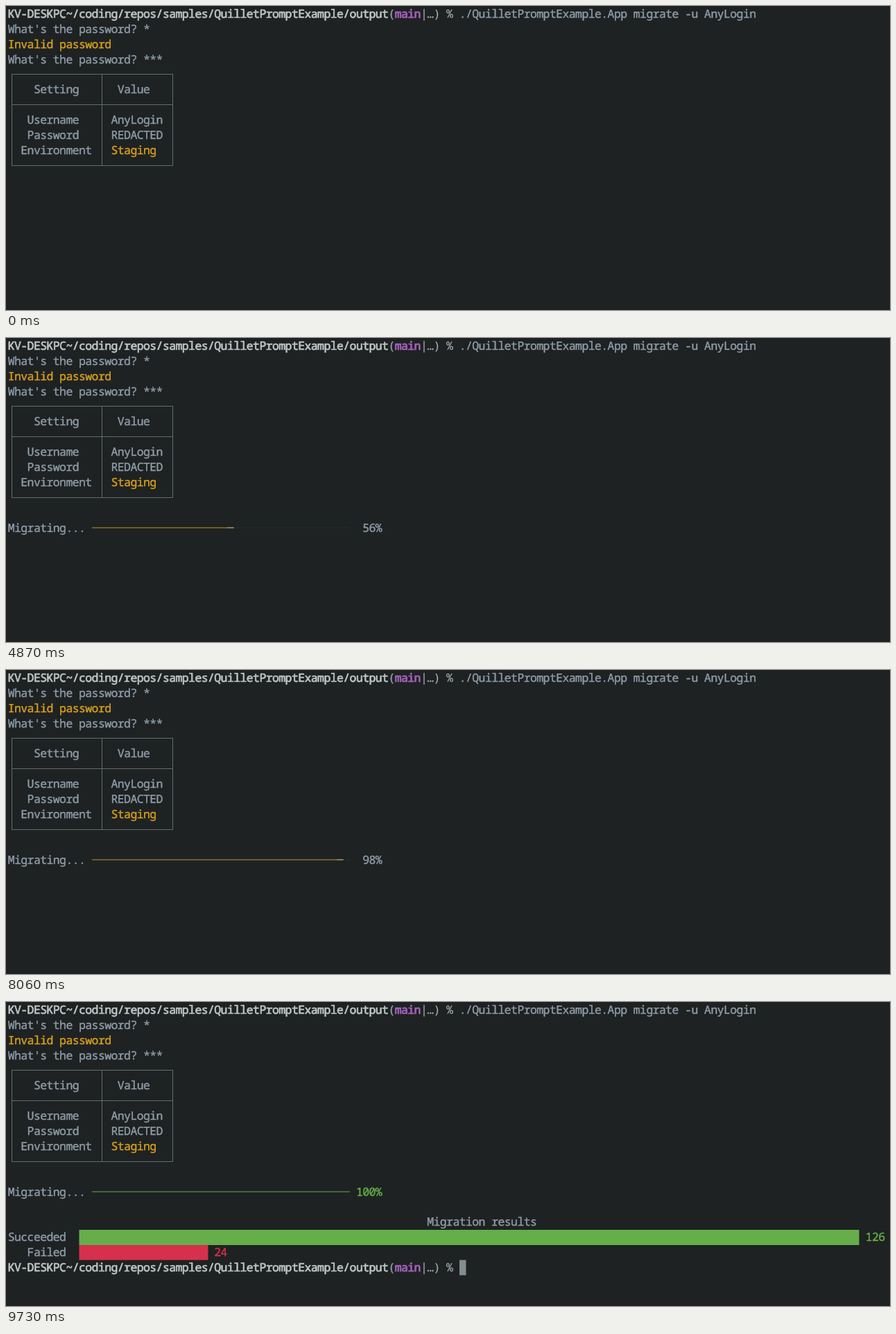
Recreate the animation shown at these times as an HTML page with a canvas. Size 1275 by 439 pixels, loop 9.8 s.

```html
<!DOCTYPE html>
<html lang="en">
<head>
<meta charset="utf-8">
<title>Migration terminal</title>
<style>
  html, body { margin: 0; width: 100%; height: 100%; overflow: hidden; background: #1e2222; }
  canvas { display: block; }
</style>
</head>
<body>
<canvas id="stage" width="1275" height="439"></canvas>
<script>
const ctx = document.getElementById('stage').getContext('2d');
const LOOP = 9800, CELL = 9.3, ROW = 21.9, LEFT = 3;
const DONE = 8130, PROMPT = 9450;
const C = {
  bg: '#1e2222', text: '#8f9ca9', bright: '#bfc5c6', purple: '#a25fb8',
  yellow: '#d8a01c', line: '#bd9334', pale: '#a39c84', track: '#1d3037',
  green: '#66ae49', red: '#d6304c', border: '#646c6c', cursor: '#838e8e'
};
const project = 'QuilletPromptExample';

// Screen refreshes: first time, gap, count
const refreshes = [
  [200, 140, 8], [1310, 140, 8], [2490, 165, 3], [3020, 165, 3],
  [3550, 215, 5], [4670, 200, 2], [5130, 230, 3], [5850, 260, 2],
  [6440, 260, 2], [7030, 260, 1], [7290, 70, 12]
].flatMap(([start, gap, n]) => Array.from({ length: n }, (_, i) => start + i * gap));

const colX = col => LEFT + col * CELL;

// A thin outline sets the stroke weight of the terminal face
function write(row, col, text, color = C.text, outline = 0.4) {
  ctx.fillStyle = ctx.strokeStyle = color;
  ctx.lineWidth = outline;
  [...text].forEach((ch, i) => {
    if (ch === ' ') return;
    const x = colX(col + i + 0.5), y = 16.8 + row * ROW;
    ctx.fillText(ch, x, y);
    ctx.strokeText(ch, x, y);
  });
}

function rect(x, y, w, h, color) {
  ctx.fillStyle = color;
  ctx.fillRect(x, y, w, h);
}

function prompt(row) {
  write(row, 0, `KV-DESKPC~/coding/repos/samples/${project}/output`, C.bright, 0.7);
  write(row, 59, '(');
  write(row, 60, 'main', C.purple, 0.9);
  write(row, 64, '|…) %', '#a3abb0', 0.2);
}

function table() {
  for (const y of [98, 142, 230]) rect(8, y, 233, 1, C.border);
  for (const x of [8, 138, 240]) rect(x, 98, 1, 133, C.border);
  write(5, 4, 'Setting');
  write(5, 17, 'Value');
  write(7, 3, 'Username');
  write(7, 16, 'AnyLogin');
  write(8, 3, 'Password');
  write(8, 16, 'REDACTED');
  write(9, 2, 'Environment');
  write(9, 16, 'Staging', C.yellow);
}

function percentAt(t) {
  if (t >= DONE) return 100;
  const tick = refreshes.filter(r => r <= t).pop();
  const p = tick < 7290 ? 11 + (tick - 1180) / 81.4 : 86 + (tick - 7290) / 60;
  return Math.max(0, Math.floor(p));
}

function progress(t) {
  const p = percentAt(t), done = p === 100;
  const cells = Math.floor(p * 0.4);
  const line = (from, to, color) =>
    rect(colX(13 + from), 273.5, (to - from) * CELL, 1, color);
  write(12, 0, 'Migrating...');
  line(cells, 40, C.track);
  line(0, cells, done ? C.green : C.line);
  if (!done && cells) line(cells - 1, cells, C.pale);
  write(12, 54, `${p}%`.padStart(4), done ? C.green : C.text);
}

function results() {
  write(14, 65, 'Migration results');
  write(15, 0, 'Succeeded');
  write(16, 3, 'Failed');
  rect(105.5, 329, 1125, 22, C.green);
  rect(105.5, 351, 186, 21.6, C.red);
  write(15, 133, '126', C.green);
  write(16, 32, '24', C.red);
}

function draw(t) {
  rect(0, 0, 1275, 439, C.bg);
  prompt(0);
  write(0, 70, `./${project}.App migrate -u AnyLogin`);
  write(1, 0, "What's the password? *");
  write(2, 0, 'Invalid password', C.yellow);
  write(3, 0, "What's the password? ***");
  table();
  if (t >= refreshes[0]) progress(t);
  if (t >= DONE) results();
  if (t >= PROMPT) {
    prompt(17);
    rect(654, 372.6, 9.5, 22, C.cursor);
  }
}

ctx.font = '16.5px "Noto Sans Mono", "DejaVu Sans Mono", monospace';
ctx.textAlign = 'center';
ctx.textRendering = 'geometricPrecision';
ctx.lineJoin = 'round';
const begin = performance.now();
function tick() {
  draw((performance.now() - begin) % LOOP);
  requestAnimationFrame(tick);
}
tick();
</script>
</body>
</html>
```
